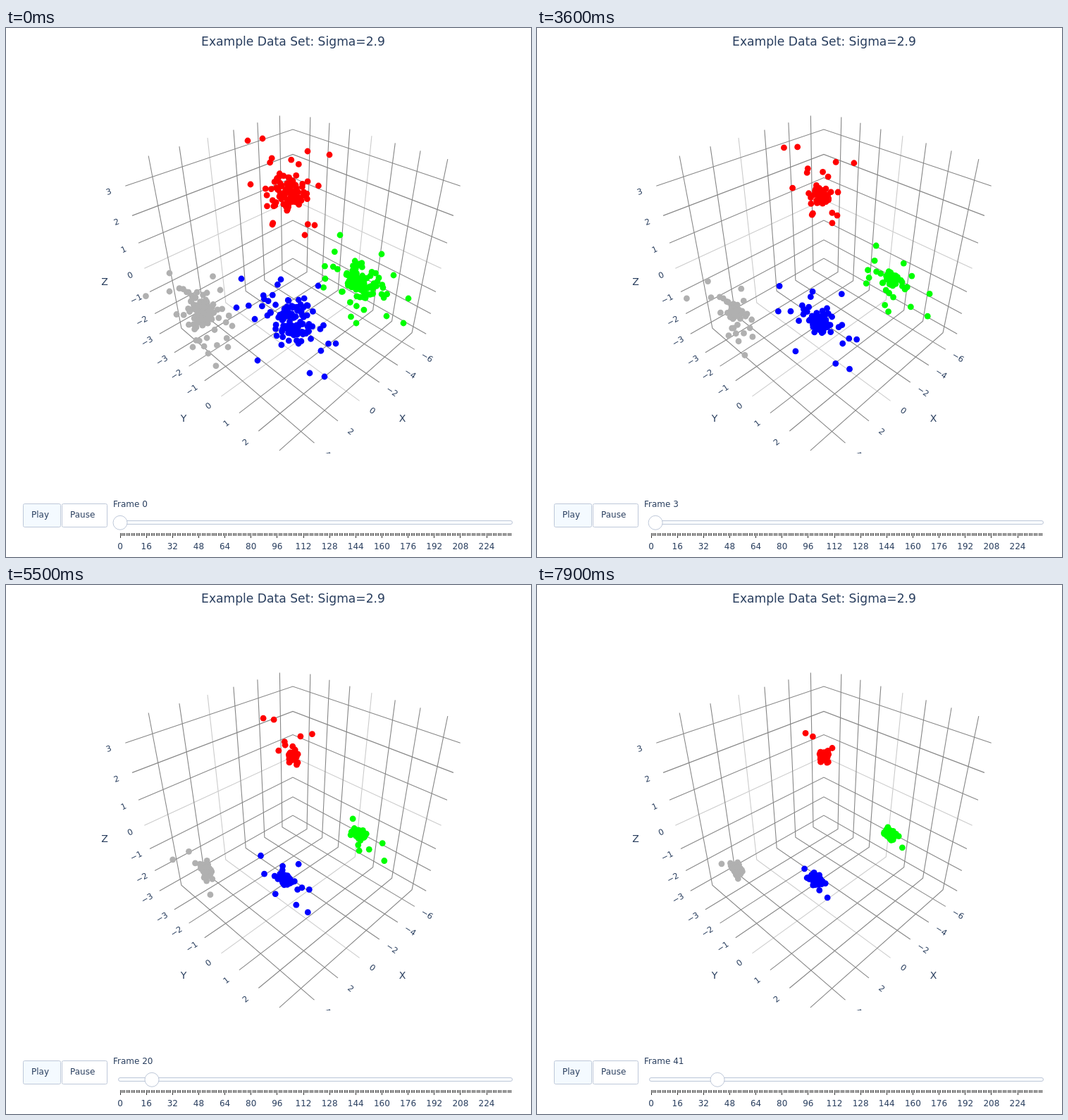
Write an HTML page with a canvas that moves like this. It is 745 px wide and 751 px high and loops after 8000 ms.

```html
<!DOCTYPE html>
<html lang="en">
<head>
<meta charset="utf-8">
<title>Clustering</title>
<style>
html, body { margin: 0; width: 100%; height: 100%; overflow: hidden; background: #fff; }
canvas { display: block; width: 745px; height: 751px; }
</style>
</head>
<body>
<canvas id="stage"></canvas>
<script>
const W = 745, H = 751, LOOP = 8000, START = 3300, STEP = 113.5;
const INK = '#2a3f5f', EDGE = '#bec8d9', FONT = '"DejaVu Sans", Verdana, sans-serif';
const canvas = document.getElementById('stage');
const ctx = canvas.getContext('2d');
const ratio = window.devicePixelRatio || 1;
canvas.width = W * ratio;
canvas.height = H * ratio;

let seed = 7;
function rand() {
  seed = (seed * 16807) % 2147483647;
  return seed / 2147483647;
}
const gauss = () => Math.sqrt(-2 * Math.log(rand())) * Math.cos(2 * Math.PI * rand());
const mix = (a, b, k) => a + (b - a) * k;
const soft = v => 5 * Math.log(1 + Math.exp(v / 5));

// Perspective view of a unit cube around the origin, seen from (1.25, 1.25, 1.25).
const FOCAL = 649.4, DIST = 1.25 * Math.sqrt(3);
function project(x, y, z) {
  const scale = FOCAL / (DIST - (x + y + z) / Math.sqrt(3));
  return [407 + scale * (y - x) / Math.SQRT2, 335 - scale * (2 * z - x - y) / Math.sqrt(6)];
}

// Each axis: tick values, cube position of a value, corners of its grid line.
// The last corner lies by the label; `far` moves it out from the cube.
const axes = [
  { first: -6, last: 4, by: 2, at: v => 0.0612 + 0.0773 * v,
    line: (p, far) => [[p, -0.5, 0.5], [p, -0.5, -0.5], [p, far, -0.5]] },
  { first: -3, last: 3, by: 1, at: v => 0.0245 + 0.1319 * v,
    line: (p, far) => [[-0.5, p, 0.5], [-0.5, p, -0.5], [far, p, -0.5]] },
  { first: -3, last: 3, by: 1, at: v => -0.0255 + 0.1431 * v,
    line: (p, far) => [[-0.5, 0.5, p], [-0.5, -0.5, p], [far, -0.5, p]] }
];

// Outliers are start positions; the body of a cluster is a seeded tilted cloud.
const clusters = [
  { color: '#b0b0b0', goal: [284, 403], from: [279, 402], tilt: 57, spread: [25, 16], count: 95,
    outliers: [[232, 348], [232, 374], [304, 372], [321, 423], [287, 462], [315, 453], [265, 453]] },
  { color: '#00ff00', goal: [501, 353], from: [502, 363], tilt: 40, spread: [22, 15], count: 95,
    outliers: [[474, 294], [533, 321], [453, 356], [550, 351], [571, 384], [564, 419], [497, 419], [540, 409]] },
  { color: '#ff0000', goal: [408, 245], from: [402, 234], tilt: 90, spread: [20, 17], count: 95,
    outliers: [[343, 160], [364, 157], [428, 175], [459, 180], [347, 222], [378, 279], [424, 294], [438, 280]] },
  { color: '#0000ff', goal: [395, 419], from: [405, 411], tilt: 45, spread: [29, 18], count: 105,
    outliers: [[334, 356], [327, 397], [390, 357], [443, 366], [357, 472], [431, 490], [452, 495], [468, 448]] }
];

function turned([cx, cy], u, v, tilt) {
  const a = tilt * Math.PI / 180, cos = Math.cos(a), sin = Math.sin(a);
  return [cx + u * cos - v * sin, cy + u * sin + v * cos];
}

// A dot ends in a small streak around the goal, on the side it came from.
function makeDot(c, start) {
  const [u, v] = turned([0, 0], start[0] - c.goal[0], start[1] - c.goal[1], -c.tilt);
  const near = (d, s) => 0.38 * s * Math.tanh(d / s / 1.5);
  const end = turned(c.goal, near(u, c.spread[0]), near(v, c.spread[1]), c.tilt);
  return { start, end, reach: Math.hypot(start[0] - end[0], start[1] - end[1]) };
}

for (const c of clusters) {
  const starts = c.outliers.slice();
  for (let i = 0; i < c.count; i++) {
    const size = 0.35 + 0.95 * rand();
    starts.push(turned(c.from, gauss() * size * c.spread[0], gauss() * size * c.spread[1], c.tilt));
  }
  c.dots = starts.map(s => makeDot(c, s));
}

// A quick first pull, stronger in the dense middle, then a steady drift.
function place({ start, end, reach }, n) {
  const pull = Math.max(8, 26 - 0.14 * reach);
  const moved = pull * (1 - Math.exp(-n / 2)) + 1.25 * n;
  const k = 1 - soft(reach - moved) / soft(reach);
  return [mix(start[0], end[0], k), mix(start[1], end[1], k)];
}

function text(str, x, y, size = 12, align = 'left') {
  ctx.font = size + 'px ' + FONT;
  ctx.textAlign = align;
  ctx.fillStyle = INK;
  ctx.fillText(str, x, y);
}

function drawTick(value, from, to) {
  const slope = Math.atan((to[1] - from[1]) / (to[0] - from[0]));
  ctx.save();
  ctx.translate(...to);
  ctx.rotate(slope);
  text(String(value).replace('-', '\u2212'), 0, 4.2, 11.5, 'center');
  ctx.restore();
}

function drawGrid(zero) {
  ctx.strokeStyle = zero ? '#cbcbcb' : '#868686';
  ctx.lineWidth = 1.1;
  for (const axis of axes) {
    for (let v = axis.first; v <= axis.last; v += axis.by) {
      if ((v === 0) !== zero) continue;
      const p = axis.at(v);
      const pts = axis.line(p, 0.5).map(q => project(...q));
      ctx.beginPath();
      pts.forEach(q => ctx.lineTo(...q));
      ctx.stroke();
      drawTick(v, pts[2], project(...axis.line(p, 0.575)[2]));
    }
  }
}

function drawScene(n) {
  ctx.save();
  ctx.beginPath();
  ctx.rect(80, 66, 640, 538);
  ctx.clip();
  drawGrid(true);
  drawGrid(false);
  text('X', 562.5, 559, 14, 'center');
  text('Y', 252, 559, 14, 'center');
  text('Z', 140, 365, 14, 'center');
  for (const c of clusters) {
    ctx.fillStyle = c.color;
    for (const dot of c.dots) {
      ctx.beginPath();
      ctx.arc(...place(dot, n), 4.4, 0, 2 * Math.PI);
      ctx.fill();
    }
  }
  ctx.restore();
}

function box(x, y, w, h, r, fill) {
  ctx.beginPath();
  ctx.roundRect(x, y, w, h, r);
  ctx.fillStyle = fill;
  ctx.fill();
  ctx.strokeStyle = EDGE;
  ctx.lineWidth = 1;
  ctx.stroke();
}

function drawControls(n, label) {
  box(24.5, 675.5, 53, 33, 2, '#f4faff');
  box(79.5, 675.5, 64, 33, 2, '#fff');
  text('Play', 36, 695);
  text('Pause', 91, 695);
  text('Frame ' + label, 152, 680);
  box(159.5, 699.5, 559, 5, 2.5, '#f8fafc');
  const gap = 520 / 224;
  for (let i = 0; i < 240; i++) {
    const x = 161.5 + i * gap, major = i % 16 === 0;
    ctx.fillStyle = '#333';
    ctx.fillRect(Math.round(x), 717, 1, major ? 7 : 4);
    if (major) text(i, x + 0.5, 740, 12, 'center');
  }
  box(152 + n * gap, 692.3, 20, 20, 10, '#fff');
}

function draw(time) {
  const t = Math.floor((time % LOOP) / 100) * 100;
  const n = Math.max(0, (t - START) / STEP);
  const label = t < START ? 0 : 1 + Math.floor(n);
  ctx.setTransform(ratio, 0, 0, ratio, 0, 0);
  ctx.fillStyle = '#fff';
  ctx.fillRect(0, 0, W, H);
  text('Example Data Set: Sigma=2.9', 407.5, 25, 17.15, 'center');
  drawScene(n);
  drawControls(n, label);
}

const begin = performance.now();
function loop() {
  draw(performance.now() - begin);
  requestAnimationFrame(loop);
}
loop();
</script>
</body>
</html>
```
